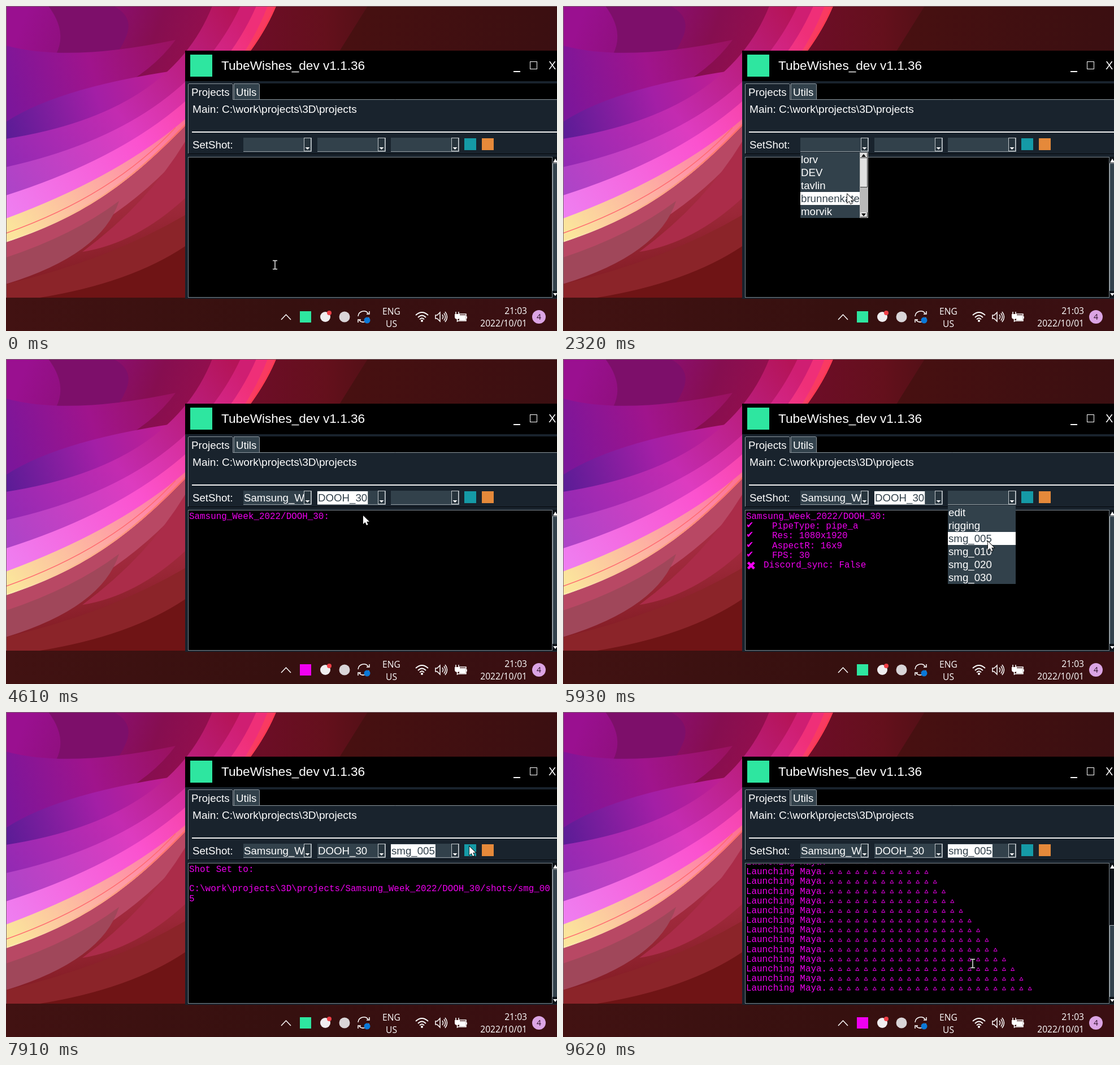
An HTML page with a canvas that plays this animation: 975x575 px, repeating every 9.64 s.

```html
<!DOCTYPE html>
<html lang="en">
<head>
<meta charset="utf-8">
<title>Shot launcher</title>
<style>
html, body { margin: 0; width: 100%; height: 100%; overflow: hidden; background: #000; }
canvas { display: block; }
</style>
</head>
<body>
<canvas id="stage" width="975" height="575"></canvas>
<script>
const LOOP = 9640;
const UI = '"Liberation Sans", Arial, sans-serif';
const MONO = '"Liberation Mono", "Courier New", monospace';
const TRAY = '"Open Sans", sans-serif';
const SLATE = '#32414b', PANEL = '#19232d', MAGENTA = '#f000f0', GREEN = '#2ee6a0';
const screen = document.getElementById('stage').getContext('2d');
const backdrop = document.createElement('canvas');
backdrop.width = 975;
backdrop.height = 575;
let c = backdrop.getContext('2d');

function box(x, y, w, h, color) {
  c.fillStyle = color;
  c.fillRect(x, y, w, h);
}
function frame(x, y, w, h, color) {
  c.strokeStyle = color;
  c.lineWidth = 1;
  c.strokeRect(x + .5, y + .5, w - 1, h - 1);
}
function text(s, x, y, { size = 18.7, font = UI, color = '#fff', align = 'left' } = {}) {
  c.font = `${size}px ${font}`;
  c.fillStyle = color;
  c.textAlign = align;
  c.fillText(s, x, y);
}
function fill(d, color) {
  c.fillStyle = color;
  c.fill(new Path2D(d));
}
function line(d, color = '#fff', width = 1.5) {
  c.strokeStyle = color;
  c.lineWidth = width;
  c.stroke(new Path2D(d));
}
function disc(x, y, r, color) {
  c.fillStyle = color;
  c.beginPath();
  c.arc(x, y, r, 0, 7);
  c.fill();
}
function blend(x0, y0, x1, y1, ...colors) {
  const g = c.createLinearGradient(x0, y0, x1, y1);
  colors.forEach((color, i) => g.addColorStop(i / (colors.length - 1), color));
  return g;
}
function clipped(x, y, w, h, draw) {
  c.save();
  c.beginPath();
  c.rect(x, y, w, h);
  c.clip();
  draw();
  c.restore();
}

function drawWallpaper() {
  box(0, 0, 975, 575, blend(430, 0, 975, 0, '#6e0d28', '#64101c', '#471012', '#40100f', '#3a0f10'));
  fill('M640 0L975 0 975 80 590 80Z', blend(590, 0, 975, 0, '#481011', '#3b0f11'));
  box(0, 200, 320, 320, blend(180, 260, 230, 516, '#b53150', '#9a2737', '#701415'));
  fill('M0 418C120 380 230 300 317 212L317 255Q190 400 0 462Z', '#b84864');
  fill('M0 445Q120 405 200 345Q170 440 0 492Z', '#a0475a');
  fill('M317 240L317 340Q230 420 135 435Q250 350 317 240Z', '#ab2c49');
  fill('M0 492Q180 450 317 370L317 516 0 516Z', '#8b2429');
  fill('M60 516Q220 490 317 425L317 516Z', '#6f1415');

  const arc = 'M478 0C455 55 420 105 317 212S130 375 0 418';
  c.save();
  c.clip(new Path2D(arc + 'L0 0Z'));
  box(0, 0, 480, 420, blend(40, 0, 360, 120, '#9a1090', '#8c0f78', '#860e50', '#970f4c'));
  fill('M75 0Q120 60 70 110Q180 130 210 60Q230 20 190 0Z', '#7d0f6a');
  fill('M0 70Q110 100 300 60Q220 170 0 210Z', blend(0, 150, 300, 60, '#7c169a', '#a0148c', '#9a125e'));
  fill('M0 205Q100 140 330 110Q200 260 0 300Z', blend(0, 230, 330, 120, '#5a1c96', '#a31fa6', '#c91f8c'));
  const bands = [
    [235, 290, 190, 365, ['#8429b4', '#c32bb0', '#b51458']],
    [285, 315, 215, 415, ['#a545c8', '#dd3cc0', '#cf1e72']],
    [335, 345, 225, 443, ['#ee80f2', '#fb52cf', '#ef2f78']],
    [376, 372, 238, 463, ['#fbe49c', '#ff88a8', '#f93a62']]
  ];
  for (const [left, cx, cy, top, colors] of bands)
    fill(`${arc}L0 ${left}Q${cx} ${cy} ${top} 0Z`, blend(0, 380, 440, 60, ...colors));
  line(arc, blend(0, 400, 440, 60, '#fbe9a8', '#ff8272', '#ff3a50'), 5);
  line('M0 402Q190 335 300 215', '#ff6a70', 1.5);
  c.restore();
}

function drawTaskbar() {
  box(0, 516, 975, 59, blend(0, 0, 975, 0, '#421212', '#36100f', '#3b0f12'));
  line('M487 555L495.500 546L504 555');
  disc(565, 550, 9, '#f0eef0');
  disc(572, 543, 4, '#ee4048');
  disc(599, 550, 9.500, '#d9d5d8');
  line('M623 549A10 10 0 0 1 641 544M643 540V545H638M642 551A10 10 0 0 1 625 556M623 560V555H628');
  disc(639, 556, 5.500, '#0a78d8');
  const label = (s, x, y, align) => text(s, x, y, { size: 15.6, font: TRAY, align });
  label('ENG', 682, 546, 'center');
  label('US', 682, 568, 'center');
  label('21:03', 922, 545, 'right');
  label('2022/10/01', 922, 567, 'right');
  line('M725 547Q736 537 747 547M729 551Q736 544 743 551M732 554.500Q736 550 740 554.500', '#fff', 1.8);
  disc(736, 557, 2, '#fff');
  line('M760 547H763L768 542V558L763 553H760ZM772 546Q775 550 772 554M775 543.500Q780 550 775 556.500M777 541Q784 550 777 559');
  line('M801 545H814V557H799M815 549V553');
  box(802, 547, 11, 9, '#fff');
  fill('M794 545H803V550Q803 554 798.500 554T794 550Z', '#fff');
  line('M796 545V541M801 545V541M798.500 553V559');
  disc(943, 550, 12, '#dba4e4');
  text('4', 943, 555, { size: 14, font: TRAY, color: '#33142e', align: 'center' });
}

function drawWindow() {
  box(317, 79, 658, 439, PANEL);
  box(317, 79, 658, 54, '#000');
  box(326, 86, 39, 39, GREEN);
  text('TubeWishes_dev v1.1.36', 381, 113, { size: 22.6 });
  box(898, 115, 12, 2, '#fff');
  frame(927, 98, 13, 14, '#fff');
  text('X', 960, 112, { size: 20 });

  box(449, 137, 526, 28, '#000');
  box(403, 138, 45, 27, SLATE);
  line('M322.500 262V138.500L324 137.500H400L401.500 139V165.500H975M403.500 165V137.500H447L448.500 139V165', '#8d979e', 1);
  text('Projects', 328, 158.500);
  text('Utils', 407, 158.500);
  text('Main: C:\\work\\projects\\3D\\projects', 330, 189, { size: 19.1 });
  box(329, 222, 646, 2, '#f2f2f2');
  text('SetShot:', 330, 252);
  box(322, 261, 653, 1, '#05080b');
  box(811, 234, 21, 21, '#159aa6');
  box(842, 234, 21, 21, '#e5893a');

  box(322, 267, 645, 249, '#000');
  frame(322, 267, 645, 249, '#7b858c');
  box(967, 267, 8, 249, '#0c1217');
  fill('M968 277L972 270L975 275V277Z', '#fff');
  fill('M968 508H975V509L972 513Z', '#fff');
}

const combos = [
  { x: 420, value: 'Samsung_Week_2022', set: 2750, unselect: 4610, open: 2000,
    items: ['lorv', 'DEV', 'tavlin', 'brunnenkater', 'morvik', 'reels', 'Samsung_Week_2022', 'test', 'tools'] },
  { x: 551, value: 'DOOH_30', set: 4370, unselect: 6230, open: 4010, items: ['DOOH_30'] },
  { x: 681, value: 'smg_005', set: 6230, unselect: LOOP, open: 5630,
    items: ['edit', 'rigging', 'smg_005', 'smg_010', 'smg_020', 'smg_030'] }
];

function drawCombo({ x, value, set, unselect }, t) {
  box(x, 233, 121, 25, SLATE);
  line(`M${x} 257.500H${x + 120.5}V233`, '#9aa3a9', 1);
  if (t >= set) clipped(x, 233, 107, 25, () => {
    const selected = t < unselect;
    c.font = `18.7px ${UI}`;
    if (selected) box(x, 234, c.measureText(value).width + 2, 23, '#fff');
    text(value, x + 1, 252, { color: selected ? SLATE : '#fff' });
  });
  box(x + 107, 233, 13, 24, '#27343d');
  frame(x + 107, 233, 13, 24, '#c3c9cd');
  fill(`M${x + 109.5} 250H${x + 117.5}L${x + 113.5} 254Z`, '#fff');
}

function drawList({ x, items }, t, pointer) {
  const rows = Math.min(items.length, x === 420 ? 5 : 6);
  const scrolls = items.length > rows;
  const first = !scrolls || t < 2380 ? 0 : t < 2440 ? 2 : 3;
  const height = rows * 23 + 1, width = scrolls ? 105 : 120;
  const active = Math.floor((pointer.y - 260) / 23);
  box(x, 259, 120, height, SLATE);
  clipped(x, 259, width, height, () => {
    for (let i = 0; i < rows; i++) {
      if (i === active) box(x, 260 + 23 * i, width, 23, '#fff');
      text(items[first + i], x + 1, 278 + 23 * i, { color: i === active ? SLATE : '#fff' });
    }
  });
  if (!scrolls) return;
  box(x + 105, 259, 15, height, '#b9b9b9');
  const thumb = 269 + first * 10.5;
  for (const [y, h] of [[260, 9], [thumb, 52], [365, 9]]) {
    box(x + 106, y, 13, h, '#e0e0e0');
    line(`M${x + 106} ${y + h - .5}H${x + 118.5}V${y}`, '#333', 1);
  }
  fill(`M${x + 108} 267H${x + 116}L${x + 112} 262Z`, '#000');
  fill(`M${x + 108} 367H${x + 116}L${x + 112} 372Z`, '#000');
}

const LEADING = 17.17;
const print = (s, row, x = 324) => text(s, x, 283 + row * LEADING, { size: 15.9, font: MONO, color: MAGENTA });

function printShotInfo(t) {
  print('Samsung_Week_2022/DOOH_30:', 0);
  ['PipeType: pipe_a', 'Res: 1080x1920', 'AspectR: 16x9', 'FPS: 30', 'Discord_sync: False'].forEach((s, i) => {
    if (t < 4670 + i * 60) return;
    const failed = i === 4;
    text(failed ? '✖' : '✔', 324, (failed ? 288 : 284) + (i + 1) * LEADING - (failed ? 1 : 2),
      { size: failed ? 21 : 16, font: '"DejaVu Sans", sans-serif', color: MAGENTA });
    print(s, i + 1, failed ? 355 : 370);
  });
}

function launchCount(t) {
  if (t < 8920) return 0;
  if (t < 9260) return Math.min(4, 1 + Math.floor((t - 8920) / 53));
  return Math.min(24, 6 + Math.floor((t - 9260) / 60) * 3);
}

function printLaunch(count) {
  const shift = count > 13 ? 13.25 - count : 0;
  for (let n = 1; n <= count; n++) {
    const row = n - 1 + shift;
    if (row < -1.500) continue;
    print('Launching Maya.', row);
    const y = 281.500 + row * LEADING;
    for (let k = 0; k < n; k++) {
      const x = 475 + k * 15.27;
      line(`M${x - 3} ${y}L${x} ${y - 5.5}L${x + 3} ${y}Z`, MAGENTA, 1);
    }
  }
}

function drawConsole(t) {
  const count = launchCount(t);
  clipped(323, 269, 643, 246, () => {
    if (t >= 8090) printLaunch(count);
    else if (t >= 6230) {
      print('Shot Set to:', 0);
      print('C:\\work\\projects\\3D\\projects/Samsung_Week_2022/DOOH_30/shots/smg_00', 2);
      print('5', 3);
    } else if (t >= 4610) printShotInfo(t);
    else if (t >= 2750) print("Samsung_Week_2022['DOOH_30']", 0);
  });
  const top = count > 13 ? 504 - 226 * 14 / (count + 1) : 278;
  box(968, top, 7, 504 - top, SLATE);
  line(`M975 ${Math.round(top) + .5}H967.500V504`, '#a9b1b6', 1);
}

// Pointer moves: start, end, then the place reached.
const moves = [
  [60, 460, 530, 551], [1260, 1940, 533, 250], [2000, 2200, 505, 314], [2260, 2320, 503, 333],
  [3050, 3410, 496, 292], [3470, 3650, 625, 262], [3770, 4010, 664, 248], [4130, 4310, 640, 270],
  [4370, 4610, 632, 277], [4850, 5500, 795, 248], [5690, 5930, 752, 323], [6890, 7130, 824, 247],
  [7310, 7610, 816, 231], [7670, 7910, 820, 238], [8270, 8550, 800, 331], [8720, 8720, 686, 412],
  [8920, 9080, 735, 436], [9260, 9440, 725, 445]
];

function pointerAt(t) {
  let x = 476, y = 458, since = 0;
  for (const [start, end, toX, toY] of moves) {
    if (t < start) break;
    const steps = Math.round((end - start) / 62);
    const p = t >= end ? 1 : (Math.floor((t - start) / (end - start) * steps) + 1) / (steps + 1);
    const eased = p * p * (3 - 2 * p);
    x += (toX - x) * eased;
    y += (toY - y) * eased;
    since = start;
  }
  const closed = Math.max(-1, ...combos.map(b => b.set).filter(s => s <= t));
  const overText = x > 322 && x < 966 && y > 267 && y < 516;
  return { x: Math.round(x), y: Math.round(y), beam: overText && since > closed };
}

function drawPointer({ x, y, beam }) {
  c.save();
  c.translate(x, y);
  if (beam) line('M-4 -7.500H4M-4 7.500H4M0 -7.500V7.500', '#e8e8e8', 1.5);
  else {
    const arrow = 'M0 0V15L3.500 11.700L6 17L8.500 16L6.200 10.800H11Z';
    line(arrow, '#000', 1.6);
    fill(arrow, '#fff');
  }
  c.restore();
}

const blinks = [970, 1680, 2380, 3080, 3830, 4730, 5260, 5870, 6440, 7010, 8030, 8450, 9020];

function draw(t) {
  c.drawImage(backdrop, 0, 0);
  const pointer = pointerAt(t);
  if (t >= 460 && t < 1320) {
    c.fillStyle = 'rgba(255,255,255,.07)';
    c.beginPath();
    c.roundRect(515, 533, 30, 34, 4);
    c.fill();
  }
  const odd = blinks.filter(b => b <= t).length % 2;
  box(520, 540, 20, 20, odd ? MAGENTA : GREEN);
  drawConsole(t);
  for (const combo of combos) drawCombo(combo, t);
  const open = combos.find(b => t >= b.open && t < b.set);
  if (open) drawList(open, t, pointer);
  if (t >= 770 && t < 1380) {
    box(468, 476, 103, 28, '#2b2b2b');
    frame(468, 476, 103, 28, '#4a4a4a');
    text('TubeWishes', 519.500, 495, { size: 15, font: TRAY, align: 'center' });
  }
  if (open) pointer.beam = false;
  drawPointer(pointer);
}

drawWallpaper();
drawTaskbar();
drawWindow();
box(0, 0, 975, 1, '#7a6a70');
box(0, 0, 1, 516, '#7a6a70');
c = screen;

function tick() {
  draw(performance.now() % LOOP);
  requestAnimationFrame(tick);
}
tick();
</script>
</body>
</html>
```
